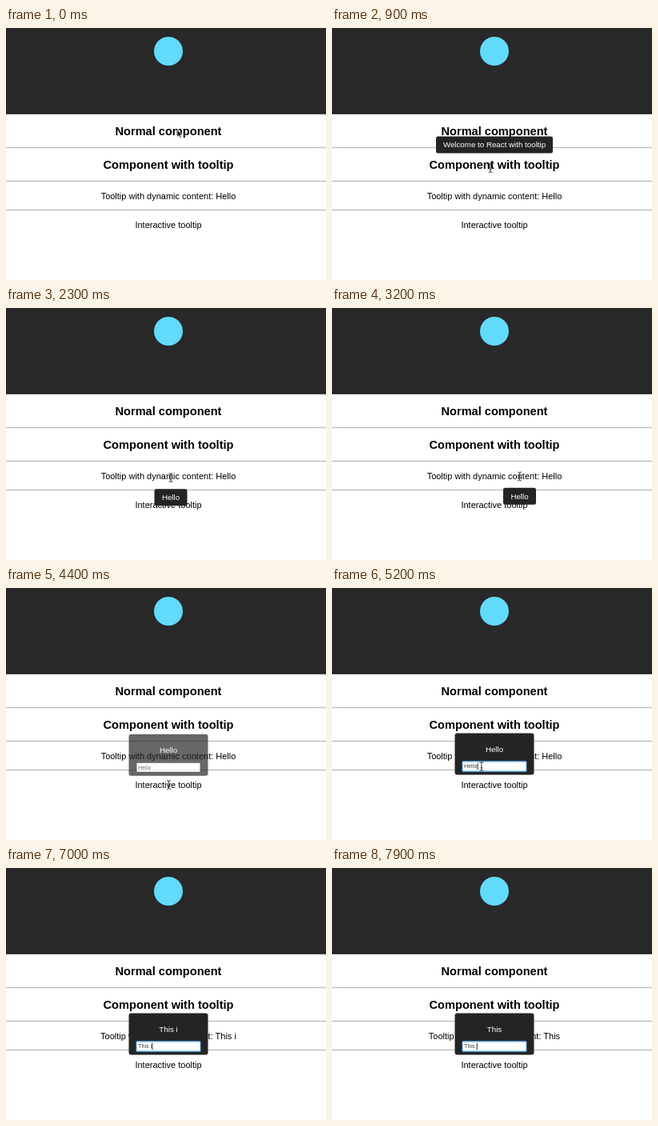
An HTML page that plays this animation: 400x315 px, repeating every 8 s.

```html
<!DOCTYPE html>
<html lang="en">
<head>
<meta charset="utf-8">
<title>Tooltips</title>
<style>
  html, body { margin: 0; width: 100%; height: 100%; overflow: hidden; background: #fff; }
  svg { display: block; width: 400px; height: 315px; }
  text { font: 11px "Liberation Sans", Arial, sans-serif; text-anchor: middle; }
  .head { font-size: 14.6px; font-weight: bold; }
  .tip rect { fill: #242424; }
  .tip text { font-size: 9.75px; fill: #fff; }
  #panel .field { fill: #fff; }
  #panel #value { font: 6.8px Inter, "Open Sans", sans-serif; fill: #333; text-anchor: start; white-space: pre; }
  #panel #selection { fill: #b4d5fe; }
  #panel #caret { fill: #111; }
</style>
</head>
<body>
<svg viewBox="0 0 400 315">
  <rect width="400" height="107.5" fill="#282828"/>
  <rect y="106" width="400" height="1.5" fill="#1c1c1c"/>
  <circle cx="203" cy="29" r="18" fill="#61dafb"/>
  <path d="M0 149.5H400M0 191.5H400M0 227.5H400" stroke="#c2c2c2" stroke-width="1.4"/>
  <text class="head" x="203" y="133.5">Normal component</text>
  <text class="head" x="203" y="176">Component with tooltip</text>
  <text id="dynamic" x="203" y="214"></text>
  <text x="203" y="249.5">Interactive tooltip</text>

  <g id="welcome" class="tip">
    <rect x="130" y="135.5" width="146" height="21" rx="2.5"/>
    <text x="203" y="149.3">Welcome to React with tooltip</text>
  </g>
  <g id="follow" class="tip">
    <rect x="-20.5" width="41" height="21" rx="2.5"/>
    <text y="14">Hello</text>
  </g>
  <g id="panel" class="tip">
    <rect x="153.5" y="181.5" width="99" height="52" rx="3"/>
    <text id="echo" x="203" y="205"></text>
    <rect id="ring" x="162.5" y="216" width="81" height="14" rx="1.5" style="fill:#5a9ee0"/>
    <rect class="field" x="163.5" y="217.5" width="79" height="11"/>
    <rect id="selection" x="165" y="218.5" height="9"/>
    <text id="value" x="165" y="225.4"></text>
    <rect id="caret" y="218.8" width="0.9" height="8.4"/>
  </g>

  <g id="cursor">
    <path id="arrow" d="M0 0V9.5L2.2 7.6L3.8 11L5.3 10.3L3.8 7H6.6Z" fill="#111" stroke="#fff" stroke-width=".8"/>
    <path id="beam" d="M-2.3 -5.5Q0 -5.5 0 -4V4Q0 5.5 -2.3 5.5M2.3 -5.5Q0 -5.5 0 -4M0 4Q0 5.5 2.3 5.5M-1.3 1.8H1.3" fill="none" stroke="#333" stroke-width="1"/>
  </g>
</svg>
<script>
const LOOP = 8000, STEP = 100;
const $ = id => document.getElementById(id);

// time, x, y
const path = [
  [0, 214, 127], [300, 211, 137], [600, 201, 166], [900, 198, 175], [1300, 198, 176],
  [1800, 200, 207], [2300, 206, 212], [2700, 215, 211], [3200, 234.5, 210.5],
  [3500, 235, 212], [3800, 226, 236], [4100, 207, 250], [4400, 203.5, 246],
  [4700, 203, 245], [5100, 190, 223], [5400, 178, 223], [8000, 178, 223]
];
const typed = [
  [0, "Hello"], [5900, "T"], [6100, "Th"], [6400, "Thi"], [6600, "This"], [6800, "This "],
  [6900, "This i"], [7100, "This is"], [7500, "This i"], [7700, "This "]
];

const clamp = v => Math.max(0, Math.min(1, v));
const fade = (t, start, end) => clamp((t - start) / 290) * clamp((end - t) / 290);
const show = (id, on) => $(id).setAttribute("visibility", on ? "inherit" : "hidden");

function pointer(t) {
  const i = path.findIndex(p => p[0] > t);
  const [t0, x0, y0] = path[i - 1], [t1, x1, y1] = path[i];
  let k = (t - t0) / (t1 - t0);
  k = k * k * (3 - 2 * k);
  return [x0 + (x1 - x0) * k, y0 + (y1 - y0) * k];
}

function place(id, x, y, opacity = 1) {
  $(id).setAttribute("transform", `translate(${x} ${y})`);
  $(id).setAttribute("opacity", opacity);
}

function draw(t) {
  const [x, y] = pointer(t);
  const text = typed.filter(k => k[0] <= t).pop()[1];
  $("dynamic").textContent = "Tooltip with dynamic content: " + text.trim();
  $("echo").textContent = text.trim();
  $("value").textContent = text;

  const welcome = fade(t, 450, 1750), follow = fade(t, 1800, 3800), panel = fade(t, 4200, 9000);
  place("welcome", 0, 4 * (1 - welcome), welcome);
  place("follow", x, y + 14.3 - 4 * (1 - follow), follow);
  place("panel", 0, 4 * (1 - panel), panel);

  const width = $("value").getComputedTextLength();
  const selected = t >= 5400 && t < 5900;
  $("selection").setAttribute("width", width);
  $("caret").setAttribute("x", 165.2 + width);
  show("ring", t >= 5200);
  show("selection", selected);
  show("caret", t >= 5200 && !selected);

  const rows = t < 4800 ? [171, 210, 246] : [223, 246];
  const onText = rows.some(r => Math.abs(y - r) < 8);
  place("cursor", x, y);
  show("cursor", t < 5900);
  show("beam", onText);
  show("arrow", !onText);
}

const begin = performance.now();
function tick() {
  const t = (performance.now() - begin) % LOOP;
  draw(Math.floor(t / STEP) * STEP);
  requestAnimationFrame(tick);
}
tick();
</script>
</body>
</html>
```
